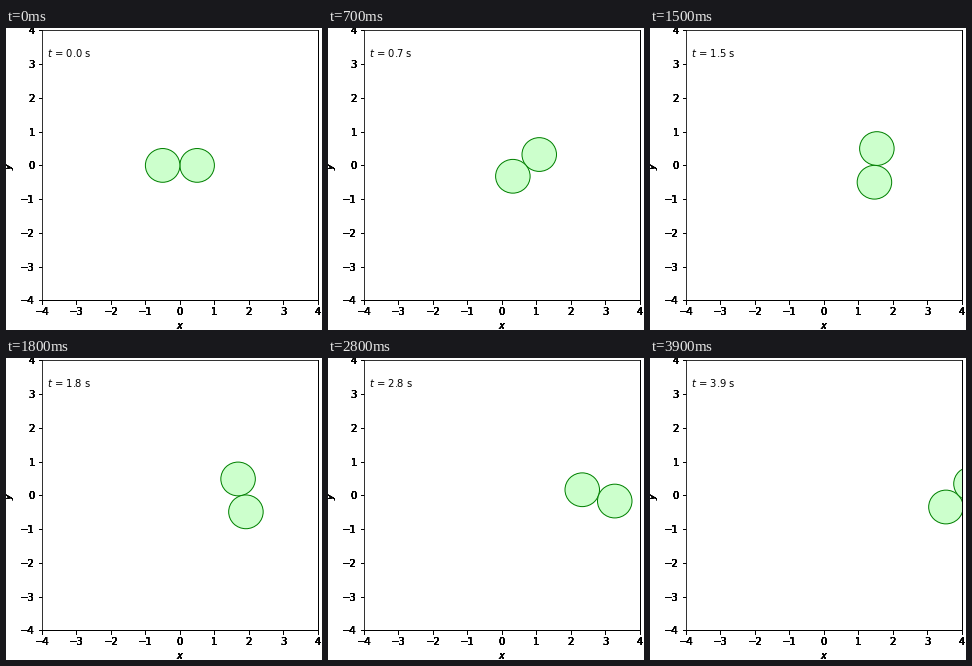
Animation, 316 px wide and 302 px high, one loop 4000 ms. Source, as a matplotlib script:

```python
import numpy as np
import matplotlib.pyplot as plt
from matplotlib.animation import FuncAnimation
from matplotlib.patches import Ellipse

W, H, DPI = 316, 302, 72
LEFT, RIGHT, TOP, BOTTOM = 35.9, 311.9, 2.4, 272.4
FRAMES, STEP = 40, 0.1
LAYERS = 8  # stacked axes darken the labels and lines outside the plot

plt.rcParams.update({"font.family": "DejaVu Sans", "font.size": 10})
fig = plt.figure(figsize=(W / DPI, H / DPI), dpi=DPI, facecolor="white")


def add_axes(z):
    box = [LEFT / W, 1 - BOTTOM / H, (RIGHT - LEFT) / W, (BOTTOM - TOP) / H]
    ax = fig.add_axes(box, zorder=z, label=f"layer{z}")
    ax.set(xlim=(-4, 4), ylim=(-4, 4), xlabel="$x$", ylabel="$y$")
    ax.set_xticks(range(-4, 5))
    ax.set_yticks(range(-4, 5))
    return ax


ax = [add_axes(z) for z in range(LAYERS)][-1]
discs = [ax.add_patch(Ellipse((0, 0), 1, 1, fc="#ccffcc", ec="green", lw=1))
         for _ in range(2)]
clock = ax.text(0.02, 0.9, "", transform=ax.transAxes)


def update(i):
    # the pair spins at 1 rad/s while its middle drifts at 1 unit/s
    t = i * STEP
    arm = 0.5 * np.array([np.cos(t), np.sin(t)])
    middle = np.array([t, 0])
    discs[0].center = middle + arm
    discs[1].center = middle - arm
    clock.set_text(f"$t$ = {t:.1f} s")
    return [*discs, clock]


anim = FuncAnimation(fig, update, frames=FRAMES, interval=1000 * STEP,
                     repeat=True, repeat_delay=0, blit=False)
plt.show()
```
